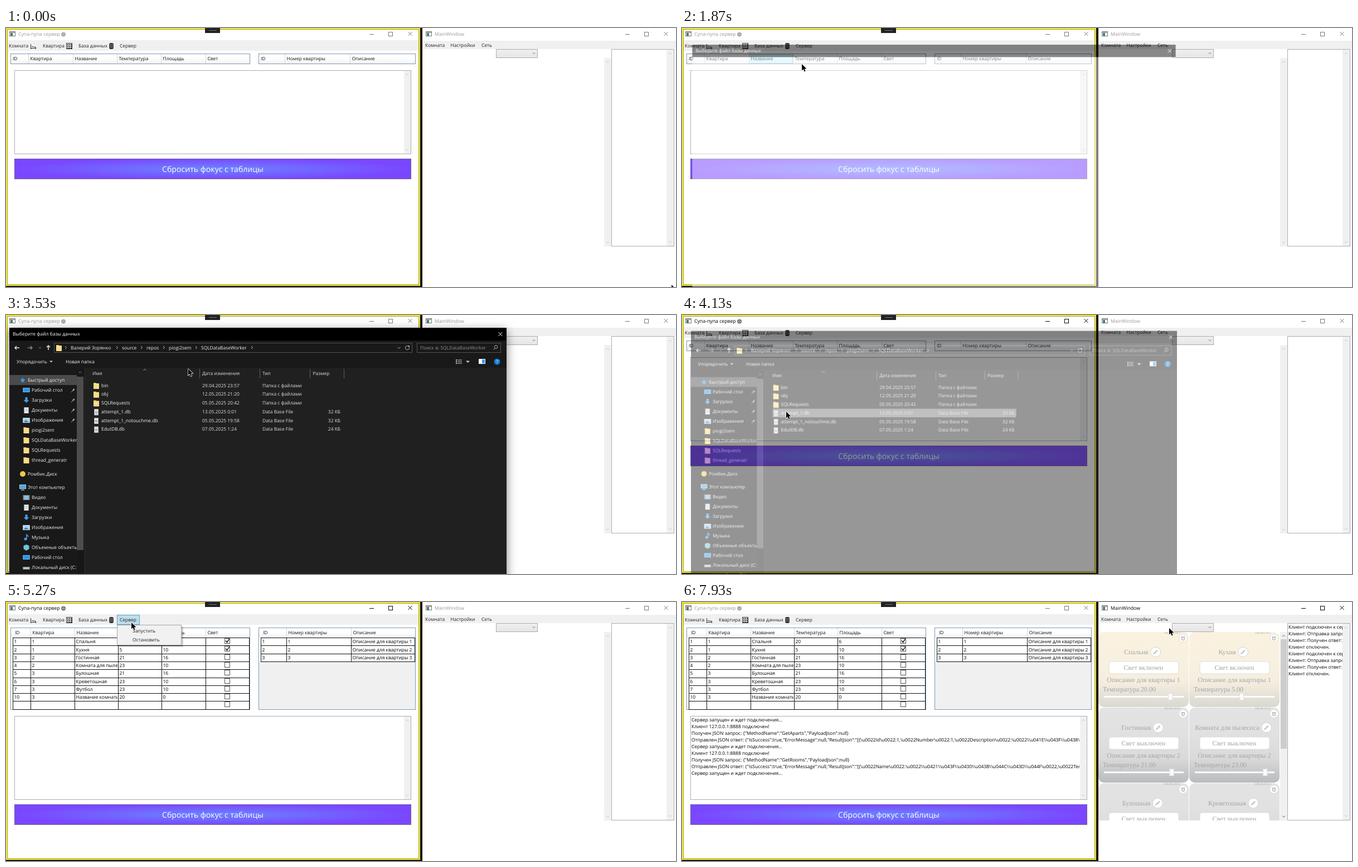
An HTML page with a canvas that plays this animation: 1202 by 466 pixels, repeating every 8000 ms.

```html
<!DOCTYPE html>
<html lang="ru">
<head>
<meta charset="utf-8">
<style>
html, body { margin: 0; width: 100%; height: 100%; overflow: hidden; background: #111; }
canvas { display: block; }
</style>
</head>
<body>
<canvas id="stage" width="1202" height="466"></canvas>
<script>
const SANS = '"Open Sans", "Noto Sans", sans-serif';
const SERIF = '"Liberation Serif", serif';
const stage = document.getElementById('stage').getContext('2d');
const layerCanvas = document.createElement('canvas');
layerCanvas.width = 1202;
layerCanvas.height = 530;
const layer = layerCanvas.getContext('2d');
let g = stage, t = 0, mouse = [0, 0];

// drawing helpers
function rect(x, y, w, h, fill, border) {
  g.fillStyle = fill;
  g.fillRect(x, y, w, h);
  if (border) {
    g.strokeStyle = border;
    g.lineWidth = 1;
    g.strokeRect(x + .5, y + .5, w - 1, h - 1);
  }
}
function line(color, width, ...p) {
  g.strokeStyle = color;
  g.lineWidth = width;
  g.beginPath();
  for (let i = 0; i < p.length; i += 2) g.lineTo(p[i], p[i + 1]);
  g.stroke();
}
function poly(color, ...p) {
  g.fillStyle = color;
  g.beginPath();
  for (let i = 0; i < p.length; i += 2) g.lineTo(p[i], p[i + 1]);
  g.fill();
}
function circle(x, y, r, fill, border) {
  g.beginPath();
  g.arc(x, y, r, 0, 7);
  if (fill) { g.fillStyle = fill; g.fill(); }
  if (border) { g.strokeStyle = border; g.lineWidth = 1; g.stroke(); }
}
function rounded(x, y, w, h, r, fill) {
  g.fillStyle = fill;
  g.beginPath();
  g.roundRect(x, y, w, h, r);
  g.fill();
}
function text(s, x, y, color = '#111', size = 8.45, align = 'left', family = SANS) {
  g.font = size + 'px ' + family;
  g.textRendering = 'geometricPrecision';
  g.textBaseline = 'middle';
  g.textAlign = align;
  g.fillStyle = color;
  g.fillText(s, x, y);
}
function clipped(x, y, w, h, draw) {
  g.save();
  g.beginPath();
  g.rect(x, y, w, h);
  g.clip();
  draw();
  g.restore();
}
function gradient(y0, y1, ...colors) {
  const fill = g.createLinearGradient(0, y0, 0, y1);
  colors.forEach((c, i) => fill.addColorStop(i / (colors.length - 1), c));
  return fill;
}
const chevron = (x, y, dir, c, s = 3) =>
  line(c, 1, x - s, y - dir * s / 2, x, y + dir * s / 2, x + s, y - dir * s / 2);
const over = (x, y, w, h) =>
  mouse[0] >= x && mouse[0] < x + w && mouse[1] >= y && mouse[1] < y + h;
const during = (a, b) => t >= a && t < b;

function scrollbar(x, y, w, h, color = '#c6c6c6') {
  rect(x, y, w, h, '#f0f0f0');
  chevron(x + w / 2, y + 7, -1, color, 2.5);
  chevron(x + w / 2, y + h - 7, 1, color, 2.5);
}
function titleBar(x, title, active, buttons) {
  rect(x, 6, 11, 9, '#fff', '#777');
  rect(x + 1, 7, 9, 2, '#aaa');
  rect(x + 2, 9, 4, 5, '#3f7f86');
  text(title, x + 16, 11.5, active ? '#000' : '#999', 8.7);
  const c = active ? '#000' : '#777', [a, b, d] = buttons;
  line(c, 1, a - 4, 11.5, a + 4, 11.5);
  g.strokeRect(b - 3.5, 7.5, 7, 7);
  line(c, 1, d - 3.5, 7, d + 3.5, 14);
  line(c, 1, d - 3.5, 14, d + 3.5, 7);
}
function menuButton(x, y, w, h) {
  rect(x, y, w, h, '#bfdde9', '#56a5cb');
}
function popup(x, y, w, items) {
  const h = items.length * 16.5 + 4;
  rect(x + 3, y + 3, w, h, 'rgba(0,0,0,.18)');
  rect(x, y, w, h, '#f1f1f1', '#a5a5a5');
  items.forEach((s, i) => {
    const top = y + 2 + i * 16.5;
    if (over(x, top, w, 16.5)) rect(x + 2, top, w - 4, 16, '#c4dfea', '#8cc4df');
    text(s, x + 28, top + 9.5, '#212121');
  });
}

// server window
const ROOMS = [
  [1, 1, 'Спальня', 20, 6], [2, 1, 'Кухня', 5, 10], [3, 2, 'Гостинная', 21, 16],
  [4, 2, 'Комната для пылесоса', 23, 10], [5, 3, 'Булошная', 21, 16],
  [6, 3, 'Креветошная', 23, 10], [7, 3, 'Футбол', 23, 10], [10, 3, 'Название комнаты', 20, 0], []
];
const FLATS = [1, 2, 3].map(n => [n, n, 'Описание для квартиры ' + n]);
const ROOM_HEADS = ['ID', 'Квартира', 'Название', 'Температура', 'Площадь', 'Свет'];
const FLAT_HEADS = ['ID', 'Номер квартиры', 'Описание'];
const WAITING = 'Сервер запущен и ждет подключения...';
const CONNECTED = 'Клиент 127.0.0.1:8888 подключен!';
const REPLY = 'Отправлен JSON ответ: {"IsSuccess":true,"ErrorMessage":null,"ResultJson":"[{';
const SERVER_LOG = [
  WAITING, CONNECTED,
  'Получен JSON запрос: {"MethodName":"GetAparts","PayloadJson":null}',
  REPLY + String.raw`\u0022Id\u0022:1,\u0022Number\u0022:1,\u0022Description\u0022:\u0022\\u041E\\u043F\\u0438\\u0441`,
  WAITING, CONNECTED,
  'Получен JSON запрос: {"MethodName":"GetRooms","PayloadJson":null}',
  REPLY + String.raw`\u0022Name\u0022:\u0022\\u0421\\u043F\\u0430\\u043B\\u044C\\u043D\\u044F\u0022,\u0022Temperature`,
  WAITING
];

function table(x, right, edges, heads, rows, filled) {
  rect(x, 46, right - x, filled ? 148 : 19, '#f0f0f0', '#7c9ab5');
  rect(x + 1, 47, right - x - 2, 17, gradient(46, 64, '#fff', '#fff', '#f0f1f4'));
  if (!filled && during(1780, 4050) && edges.length > 4) rect(120, 47, 79, 17, '#d5f2fa', '#a3d7e6');
  heads.forEach((s, i) => {
    text(s, i ? edges[i] + 3.5 : x + (filled ? 8 : 4), 56);
    if (i) line('#d3d7dc', 1, edges[i] + .5, 47, edges[i] + .5, 64);
  });
  if (!filled) return;
  rows.forEach((row, k) => {
    const y = 64 + k * 14.3;
    rect(x + 1, y, right - x - 2, 14.3, '#fff');
    heads.forEach((_, i) => {
      const left = i ? edges[i] : x + 4, end = edges[i + 1] || right;
      if (i < 5) clipped(left, y, end - left - 1, 15, () =>
        text(row[i] ?? '', left + 2.5, y + 8, '#000'));
      else {
        rect(392, Math.round(y) + 1, 10, 10, '#fff', '#555');
        if (k < 2) line('#111', 1.4, 394, y + 5.5, 396.5, y + 8.5, 400.5, y + 2.5);
      }
    });
  });
  for (let k = 0; k <= rows.length; k++) {
    const y = Math.round(64 + k * 14.3) + .5;
    line('#111', 1, x + 4, y, right - 1, y);
  }
  [x + 4, ...edges.slice(1), right - 2].forEach(v =>
    line('#111', 1, v + .5, 64, v + .5, 65 + rows.length * 14.3));
}

function menuIcons() {
  const c = '#333';
  line(c, 1, 44.5, 29, 44.5, 38);
  line(c, 1, 44, 36.5, 54, 36.5);
  line(c, 1, 46, 33.5, 53.5, 34.5, 53.5, 38);
  rect(108, 27, 11, 11, '#f0f0f0', c);
  for (let i = 0; i < 9; i++) rect(110 + i % 3 * 3, 29 + (i / 3 | 0) * 3, 2, 2, c);
  rounded(185, 27, 8, 11, 3, c);
  line('#ccc', .7, 185, 30.5, 193, 30.5);
  line('#ccc', .7, 185, 34, 193, 34);
}

function server() {
  const active = during(840, 1780) || during(4050, 6700);
  const filled = t >= 4320, dy = filled ? 129 : 0;
  rect(0, 0, 743, 464, '#fdec00');
  rect(2, 2, 739, 460, '#fff', 'rgba(0,0,0,.4)');
  titleBar(6, 'Супа-пупа сервер', active, [656, 690, 725]);
  const face = active ? '#444' : '#999';
  circle(103, 11.5, 3.5, '#cbbdb8', face);
  line(face, .8, 100, 10.5, 106, 10.5);
  line(face, .8, 101, 13, 105, 13);
  rect(357, 0, 27, 9, '#222');
  line('#777', 1, 364, 4.5, 378, 4.5);

  rect(3, 22, 737, 19, '#f0f0f0');
  if (during(840, 1740)) menuButton(125, 23, 73, 18);
  if (during(4920, 5660)) menuButton(199, 23, 41, 18);
  [['Комната', 5], ['Квартира', 66], ['База данных', 130], ['Сервер', 204]]
    .forEach(([s, x]) => text(s, x, 33, '#212121'));
  menuIcons();

  table(8, 438, filled ? [0, 44, 123, 201, 279, 358] : [0, 40, 120, 199, 278, 358], ROOM_HEADS, ROOMS, filled);
  table(453, 735, filled ? [0, 503, 619] : [0, 500, 617], FLAT_HEADS, FLATS, filled);

  rect(15, 76 + dy, 712, 151, '#fff', '#abadb3');
  scrollbar(714, 77 + dy, 12, 149);
  const lines = t < 5660 ? 0 : t < 7260 ? 1 : t < 7390 ? 5 : 9;
  clipped(16, 77 + dy, 697, 149, () =>
    SERVER_LOG.slice(0, lines).forEach((s, i) => text(s, 17, 213 + i * 12, '#000')));

  const cy = 253.5 + dy;
  clipped(15, cy - 18.5, 712, 37, () => {
    g.translate(371, cy);
    g.scale(356, 18.5);
    const glow = g.createRadialGradient(0, 0, 0, 0, 0, 1);
    glow.addColorStop(0, '#6b85ff');
    glow.addColorStop(1, '#7a47ff');
    rect(-1, -1, 2, 2, glow);
  });
  g.strokeStyle = '#70619f';
  g.lineWidth = 1;
  g.strokeRect(15.5, cy - 18, 711, 36);
  text('Сбросить фокус с таблицы', 371, cy + 1.6, '#fff', 14.1, 'center');

  if (during(990, 1740)) popup(125, 41, 125, ['Подключить', 'Отключить']);
  if (during(4990, 5660)) popup(199, 41, 116, ['Запустить', 'Остановить']);
}

// client window
const CLIENT_LOG = ['Клиент подключен к серверу.', 'Клиент: Отправка запроса...',
  'Клиент: Получен ответ: {"IsSuccess"', 'Клиент отключен.'];

function card(i) {
  const x = 747 + i % 2 * 163, y = 54 + (i >> 1) * 136, [, flat, name, temp] = ROOMS[i];
  const on = i < 2, ink = '#a3a3a3', cx = x + 81;
  const serif = (s, px, py, align) => text(s, px, py, ink, 12, align, SERIF);
  rounded(x, y, 162, 135, 10, on
    ? gradient(y, y + 135, '#faf2df', '#f9f1df', '#f5eedf', '#d9d7d1')
    : gradient(y, y + 135, '#e3e3e3', '#e1e1e1', '#dadada', '#b9bcbd'));
  text('166,66,214,5', x + 132, y + 2, ink, 5.5, 'center', SERIF);
  circle(x + 152, y + 11, 7.5, '#fff', '#ddd');
  circle(x + 152, y + 12, 2.8, '#eee', ink);
  line(ink, 1.2, x + 149, y + 8, x + 151, y + 9.5);
  line(ink, 1.2, x + 155, y + 8, x + 153, y + 9.5);
  g.font = '12px ' + SERIF;
  const w = g.measureText(name).width, left = x + 79 - (w + 22) / 2;
  serif(name, left, y + 37);
  const px = left + w + 13, py = y + 36;
  circle(px, py, 9, '#fff', '#d2d2d2');
  line(ink, 2.4, px - 2.5, py + 2.5, px + 3, py - 3);
  line('#fff', 1, px - 2.5, py + 2.5, px + 2.5, py - 2.5);
  line(ink, 1, px - 4, py + 4, px - 3, py + 2);
  rounded(x + 19, y + 53, 125, 22, 4, '#fff');
  g.strokeStyle = '#ddd';
  g.stroke();
  serif(on ? 'Свет включен' : 'Свет выключен', cx, y + 65, 'center');
  serif('Описание для квартиры ' + flat, cx, y + 87, 'center');
  serif('Температура ' + temp.toFixed(2), x + 8, y + 104);
  rect(x + 10, y + 115, 143, 3, '#fff');
  rect(x + 90 + (temp - 5) * 2.35, y + 110, 8, 13, '#fbfbfb', '#e0e0e0');
}

function client() {
  const active = t >= 6700, loaded = t >= 7590;
  rect(747, 0, 455, 466, '#fff');
  titleBar(753, 'MainWindow', active, [1115, 1149, 1184]);
  rect(747, 23, 455, 15, '#f0f0f0');
  const open = during(6790, 7250);
  if (open) menuButton(848, 23, 28, 15);
  [['Комната', 752], ['Настройки', 797.5], ['Сеть', 853]].forEach(([s, x]) => text(s, x, 31.5, '#212121'));
  rect(879, 38, 75, 16, gradient(38, 54, '#f0f0f0', '#e5e5e5'), '#acacac');
  chevron(947, 45.5, 1, '#666', 2.2);
  scrollbar(1073, 54, 13, 339, loaded ? '#606060' : undefined);
  if (loaded) {
    rect(1074, 67, 11, 197, '#cdcdcd');
    clipped(747, 54, 326, 339, () => {
      g.globalAlpha = Math.min(1, (t - 7590) / 335);
      for (let i = 0; i < 6; i++) card(i);
    });
  }
  rect(1086, 38, 113, 355, '#fff', '#abadb3');
  scrollbar(1185, 39, 13, 353);
  const lines = t < 7260 ? 0 : t < 7390 ? 4 : 8;
  clipped(1087, 39, 98, 353, () => {
    for (let i = 0; i < lines; i++) text(CLIENT_LOG[i % 4], 1088, 45.5 + i * 12.05, '#000');
  });
  if (open) popup(848, 38.5, 187, ['Получить информацию с БД']);
}

// file dialog
const FILES = {
  'net9.0-windows': [
    ['runtimes', '02.05.2025 23:13'], ['attempt_1.db', '03.05.2025 0:21', 0]],
  SQLDataBaseWorker: [
    ['bin', '29.04.2025 23:57'], ['obj', '12.05.2025 21:20'], ['SQLRequests', '05.05.2025 20:42'],
    ['attempt_1.db', '13.05.2025 0:01', 32], ['attempt_1_notouchme.db', '05.05.2025 19:58', 32],
    ['EdutDB.db', '07.05.2025 1:24', 24]]
};
const CRUMBS = [['Валерий Зорянко', 116], ['source', 208], ['repos', 252], ['piogi2sem', 292],
  ['SQLDataBaseWorker', 350], ['bin', 448], ['Debug', 478], ['net9.0-windows', 522]];
const SIDEBAR = [
  ['Быстрый доступ', 117, 'star'], ['Рабочий стол', 135, 'screen'], ['Загрузки', 153, 'down'],
  ['Документы', 171, 'file'], ['Изображения', 189, 'photo'], ['piogi2sem', 207, 'folder'],
  ['SQLDataBaseWorker', 225, 'folder'], ['SQLRequests', 243, 'folder'], ['thread_generatr', 261, 'folder'],
  ['Ромбик.Диск', 286, 'disk'], ['Этот компьютер', 310, 'pc'], ['Видео', 328, 'video'],
  ['Документы', 346, 'file'], ['Загрузки', 364, 'down'], ['Изображения', 382, 'photo'],
  ['Музыка', 400, 'note'], ['Объемные объекты', 418, 'cube'], ['Рабочий стол', 436, 'screen'],
  ['Локальный диск (C:)', 454, 'drive'], ['Новый том (D:)', 472, 'drive']
];
const ICONS = {
  star: (x, y) => poly('#3a9bea', x, y - 5, x + 1.5, y - 1.5, x + 5, y - 1, x + 2, y + 1.5, x + 3, y + 5,
    x, y + 3, x - 3, y + 5, x - 2, y + 1.5, x - 5, y - 1, x - 1.5, y - 1.5),
  screen: (x, y) => rect(x - 6, y - 4, 12, 8, '#2f95e8', '#67bdf5'),
  down: (x, y) => poly('#3d9df0', x - 2, y - 5, x + 2, y - 5, x + 2, y, x + 5, y, x, y + 5, x - 5, y, x - 2, y),
  file(x, y) {
    rect(x - 4, y - 5, 8, 11, '#f2f2f2', '#bbb');
    line('#6aa6d6', 1, x - 2, y - 1.5, x + 2, y - 1.5);
    line('#6aa6d6', 1, x - 2, y + 1.5, x + 2, y + 1.5);
  },
  photo(x, y) {
    rect(x - 6, y - 4, 12, 9, '#9fd4f5', '#eee');
    poly('#3f7fa8', x - 5, y + 4, x - 1, y, x + 5, y + 4);
  },
  folder(x, y) {
    rect(x - 5, y - 5, 5, 3, '#e6bd58');
    rect(x - 5, y - 4, 10, 10, '#fbdc86');
  },
  disk: (x, y) => circle(x, y, 5, '#f2c94c'),
  pc(x, y) {
    rect(x - 6, y - 5, 12, 8, '#4aa8e8', '#9bd0f3');
    rect(x - 3, y + 4, 6, 1.5, '#bbb');
  },
  video(x, y) {
    rect(x - 6, y - 4, 12, 9, '#888');
    rect(x - 4, y - 3, 8, 7, '#7fc0e8');
  },
  note(x, y) {
    circle(x - 1.5, y + 3, 2.5, '#3d9df0');
    line('#3d9df0', 1.5, x + .5, y + 3, x + .5, y - 5, x + 4, y - 1);
  },
  cube: (x, y) => poly('#6cc5dc', x, y - 5, x + 5, y - 3, x + 5, y + 3, x, y + 6, x - 5, y + 3, x - 5, y - 3),
  drive: (x, y) => rect(x - 6, y - 1, 12, 5, '#b9c3ca', '#7d8991')
};

function arrow(x, y, dx, dy, c) {
  line(c, 1.4, x - dx * 4, y - dy * 4, x + dx * 4, y + dy * 4);
  line(c, 1.4, x + dy * 3 + dx, y + dx * 3 + dy, x + dx * 4, y + dy * 4, x - dy * 3 + dx, y - dx * 3 + dy);
}

function dialogContent() {
  const moved = t >= 3320, place = moved ? 'SQLDataBaseWorker' : 'net9.0-windows';
  const white = '#f0f0f0', dim = '#8a8a8a', blank = t < 1980;
  rect(6, 23, 892, 500, blank ? '#fff' : '#202020');
  rect(6, 23, 892, 23, '#000');
  text('Выберите файл базы данных', 12, 35, '#fff', 8.5);
  line('#fff', 1, 883.5, 31, 890.5, 38);
  line('#fff', 1, 883.5, 38, 890.5, 31);
  if (blank) return;

  rect(6, 46, 892, 49, '#191919');
  arrow(20, 59, -1, 0, moved ? white : dim);
  arrow(43, 59, 1, 0, dim);
  chevron(61, 59, 1, dim, 2.2);
  arrow(76, 59, 0, -1, white);
  rect(86, 50, 643, 18, '#191919', '#535353');
  ICONS.folder(95, 59);
  if (!moved && over(347, 51, 97, 17)) rect(347, 51, 97, 16, '#3d3d3d', '#666');
  const path = CRUMBS.slice(0, moved ? 5 : 8);
  path.forEach(([s, x]) => text(s, x, 59.5, white));
  [...path.map(p => p[1] - 9), moved ? 441 : 594].forEach(x =>
    line('#ccc', 1, x - 1, 56, x + 1.5, 58.5, x - 1, 61));
  chevron(705, 59, 1, '#aaa', 2.5);
  g.beginPath();
  g.arc(720, 59, 3.5, 0, 5);
  g.stroke();
  poly('#aaa', 720, 55, 724, 55, 724, 59);
  rect(737, 50, 151, 18, '#191919', '#535353');
  text('Поиск в: ' + place, 743, 59.5, '#8f8f8f');
  circle(879, 57.5, 2.8, null, '#aaa');
  line('#aaa', 1, 877, 60, 874.5, 62.5);

  text('Упорядочить', 19, 84.5, white);
  poly('#ccc', 78, 82.5, 84, 82.5, 81, 85.5);
  text('Новая папка', 107, 84.5, white);
  for (let i = 0; i < 3; i++) {
    rect(807, 80 + i * 3, 2, 2, '#ccc');
    line('#ccc', 1, 810, 81 + i * 3, 818, 81 + i * 3);
  }
  poly('#ccc', 825, 82.5, 832, 82.5, 828.5, 86);
  rect(848, 79, 12, 9, '#fff');
  rect(854, 80, 5, 7, '#3a9bea');
  circle(881, 84, 5.5, '#0f7fdc');
  text('?', 881, 84.5, '#fff', 8.5, 'center');

  // navigation pane
  rect(6, 95, 135, 428, '#191919');
  rect(6, 108, 121, 18, '#4a4a4a');
  clipped(6, 95, 121, 428, () => SIDEBAR.forEach(([s, y, kind], i) => {
    const root = i === 0 || kind === 'disk' || kind === 'pc';
    ICONS[kind](root ? 30 : 36.5, y);
    text(s, root ? 39 : 46, y + .5, white);
    if (i > 0 && i < 5) {
      line('#aaa', 2.5, 120, y + 1, 122.5, y - 2);
      line('#aaa', 1, 117, y + 4, 120, y + 1);
    }
  }));
  rect(127, 97, 12, 426, '#171717');
  rect(127, 111, 12, 312, '#4d4d4d');
  chevron(133, 103, -1, '#888', 2.5);
  line('#2e2e2e', 1, 141.5, 95, 141.5, 523);

  // file list
  if (over(142, 97, 205, 18)) {
    rect(142, 97, 205, 18, '#434343');
    line('#777', 1, 334.5, 97, 334.5, 115);
    chevron(340.5, 105, 1, '#ccc', 2);
  }
  chevron(249, 98.5, -1, '#aaa', 2.5);
  [['Имя', 155], ['Дата изменения', 352], ['Тип', 460], ['Размер', 550.5]]
    .forEach(([s, x]) => text(s, x, 106, '#dedede'));
  [347, 455, 545, 606].forEach(x => line('#606060', 1, x + .5, 97, x + .5, 114));
  FILES[place].forEach(([name, date, size], i) => {
    const y = 127 + i * 15.75, isFile = size !== undefined;
    const hover = over(156, y - 8, 447, 15.7);
    if (hover) rect(156, y - 8, 447, 15.7, t > 3860 ? '#777' : '#4d4d4d');
    if (isFile) {
      rect(158, y - 5, 8, 11, '#eee', '#aaa');
      circle(162, y + 1, 2, '#c9d3dc', '#8b98a5');
    } else ICONS.folder(162, y);
    text(name, 171, y + .5, white);
    text(date, 352, y + .5, '#dedede');
    text(isFile ? 'Data Base File' : 'Папка с файлами', 460, y + .5, '#dedede');
    if (isFile) text(size + ' КБ', 600, y + .5, '#dedede', 8.45, 'right');
  });
}

function dialog() {
  if (!during(1790, 4210)) return;
  const opening = Math.min(1, (t - 1780) / 250), closing = Math.max(0, (t - 4045) / 165);
  const scale = 1 - .1 * (1 - opening) ** 3 - .042 * closing;
  const alpha = Math.min(1, opening * 1.35) * (1 - closing);
  layer.clearRect(0, 0, 1202, 530);
  g = layer;
  dialogContent();
  g = stage;
  g.save();
  g.globalAlpha = alpha;
  if (alpha === 1) {
    g.shadowColor = 'rgba(0,0,0,.5)';
    g.shadowBlur = 18;
    g.shadowOffsetY = 5;
  }
  g.translate(452, 273);
  g.scale(scale, scale);
  g.drawImage(layerCanvas, -452, -273);
  g.restore();
}

// pointer
const TRACK = [
  [0, 1194, 462], [60, 1194, 462], [800, 160, 33], [1000, 160, 33], [1550, 186, 53], [1735, 186, 53],
  [1866, 215, 65], [2390, 215, 65], [2530, 204, 106], [2680, 204, 108], [3130, 395, 59], [3330, 395, 59],
  [3860, 187, 174], [4260, 187, 174], [4870, 225, 37], [5280, 225, 37], [5470, 245, 53], [5990, 245, 53],
  [6750, 865, 38], [6880, 865, 38], [7130, 895, 49], [7260, 895, 49], [7600, 874, 47], [8000, 874, 47]
];
function pointerAt(time) {
  const i = Math.max(1, TRACK.findIndex(k => k[0] >= time));
  const [a, x0, y0] = TRACK[i - 1], [b, x1, y1] = TRACK[i];
  const p = (time - a) / (b - a), e = p * p * (3 - 2 * p);
  return [x0 + (x1 - x0) * e, y0 + (y1 - y0) * e];
}
function pointer() {
  const shape = [0, 0, 0, 11.5, 2.7, 9, 4.7, 13.4, 6.6, 12.5, 4.7, 8.4, 8.4, 8.2, 0, 0];
  const points = shape.map((v, i) => v + mouse[i % 2]);
  line('#fff', 1.4, ...points);
  poly('#000', ...points);
}

function frame() {
  t = Math.floor((performance.now() % 8000 + 5) * .015) % 120 / .015;
  mouse = pointerAt(t);
  rect(0, 0, 1202, 466, '#111');
  server();
  client();
  dialog();
  pointer();
  requestAnimationFrame(frame);
}
frame();
</script>
</body>
</html>
```
